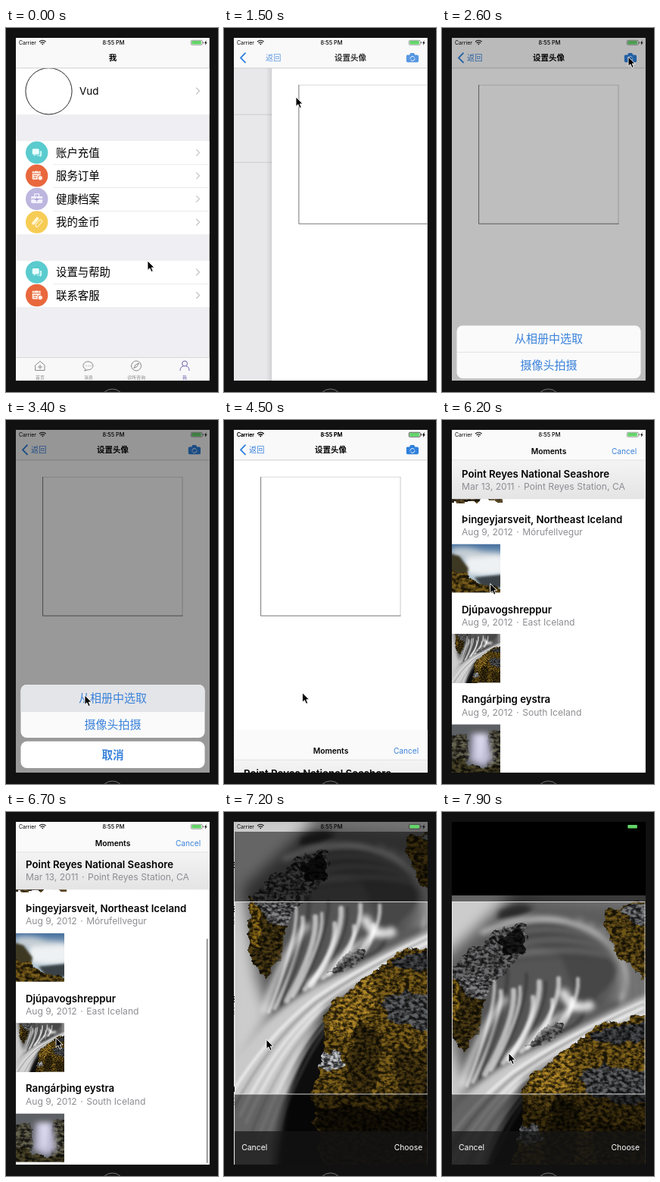
An HTML page for the animation above (8000 ms loop, 280 px wide and 480 px high).

```html
<!DOCTYPE html>
<html lang="zh">
<head>
<meta charset="utf-8">
<title>设置头像</title>
<style>
html, body { margin: 0; width: 100%; height: 100%; overflow: hidden; background: #111; }
svg { display: block; width: 100vw; height: 100vh; }
text { font-family: Inter, "Noto Sans CJK SC", "Noto Sans CJK", sans-serif; }
.mid { text-anchor: middle; }
.blue { fill: #3a82da; }
.line { fill: none; stroke-linecap: round; stroke-linejoin: round; }
</style>
</head>
<body>
<svg id="stage" viewBox="0 0 280 480"></svg>
<script>
const LOOP = 8000;
const box = (x, y, w, h, fill, more = '') =>
  `<rect x="${x}" y="${y}" width="${w}" height="${h}" fill="${fill}" ${more}/>`;
const label = (x, y, size, text, more = '') =>
  `<text x="${x}" y="${y}" font-size="${size}" ${more}>${text}</text>`;
const shape = (d, fill, more = '') => `<path d="${d}" fill="${fill}" ${more}/>`;
const stroke = (d, color, width, more = '') =>
  `<path class="line" d="${d}" stroke="${color}" stroke-width="${width}" ${more}/>`;
const group = (id, body, more = '') => `<g id="${id}" ${more}>${body}</g>`;
const filtered = (name, body) => `<g filter="url(#${name})">${body}</g>`;
const shade = id => box(13, 13, 256, 452, '#000', `id="${id}" opacity="0"`);
const blur = (id, size) => `<filter id="${id}" x="-30%" y="-30%" width="160%" height="160%"><feGaussianBlur stdDeviation="${size}"/></filter>`;

const defs = `<defs>
  <clipPath id="screen"><rect x="13" y="13" width="255.5" height="452"/></clipPath>
  <clipPath id="thumb"><rect width="64" height="64"/></clipPath>
  <clipPath id="photoEdge"><rect x="13" y="13" width="284" height="470"/></clipPath>
  <clipPath id="sheetTop"><rect x="19.5" y="349" width="243" height="70" rx="8"/></clipPath>
  ${blur('fine', 1.5) + blur('soft', 3.5) + blur('haze', 9)}
  <filter id="rough" color-interpolation-filters="sRGB">
    <feTurbulence type="fractalNoise" baseFrequency=".06" numOctaves="4" seed="7" result="n"/>
    <feTurbulence type="fractalNoise" baseFrequency=".16 .24" numOctaves="4" seed="3" result="m"/>
    <feColorMatrix in="m" values="3 0 0 0 -1  3 0 0 0 -1  3 0 0 0 -1  0 0 0 0 1" result="grain"/>
    <feDisplacementMap in="SourceGraphic" in2="n" scale="16" xChannelSelector="R" yChannelSelector="G" result="body"/>
    <feComposite in="body" in2="grain" operator="arithmetic" k1="1.3" k2=".35" result="lit"/>
    <feComposite in="lit" in2="body" operator="in"/>
  </filter>
  <linearGradient id="edge"><stop offset="0" stop-color="#000" stop-opacity="0"/><stop offset="1" stop-color="#000" stop-opacity=".1"/></linearGradient>
  <linearGradient id="band" x2="0" y2="1"><stop offset="0" stop-color="#f5f5f6"/><stop offset="1" stop-color="#e4e4e5"/></linearGradient>
  <linearGradient id="sky" x2="0" y2="1"><stop offset="0" stop-color="#456f9e"/><stop offset=".4" stop-color="#a9bdcc"/></linearGradient>
  ${group('falls', waterfall(), 'clip-path="url(#photoEdge)"')}
  ${group('status', statusBar())}
</defs>`;

function waterfall() {
  const streak = (d, color, width, alpha) => stroke(d, color, width, `opacity="${alpha}"`);
  let swirl = '', fan = '', stream = '';
  for (let i = 0; i < 8; i++) {
    swirl += streak(`M${78 + i * 6} ${62 + i * 5}Q${160 + i * 4} ${26 + i * 9} ${222 + i * 2} ${60 + i * 5}T${262 - i * 5} 150`,
      i % 2 ? '#222' : '#fff', 5, i ? .2 : .7);
    swirl += streak(`M${205 + i * 8} ${44 + i * 3}Q${270 + i * 4} 80 ${262 + i * 5} 160`, i % 2 ? '#444' : '#ddd', 5, .3);
  }
  for (let i = 0; i < 15; i++) {
    const x = 94 + i * 8.5, y = 126 + 16 * Math.sin(i * 2.3) + i;
    fan += streak(`M${x} ${y}Q${x + 3} ${y + 38} ${58 + i * 8} ${264 - i * 5}`, i % 3 == 2 ? '#383838' : '#fff', 4 + i % 4, .6);
  }
  for (let i = 0; i < 8; i++) {
    stream += streak(`M290 ${154 + i * 3}Q${185 + i} ${200 + i * 4} ${118 + i * 3} ${246 + i * 5}Q${50 + i * 7} ${300 + i * 4} ${4 + i * 8} ${380 + i * 10}`,
      i % 3 == 1 ? '#8c8c8c' : '#fff', 4, .6 - i * .05);
  }
  return box(13, 13, 284, 470, '#5c5c5c')
    + filtered('haze', shape('M0 0H130L60 66L24 100L42 220L60 270L0 380Z', '#ccc') + shape('M90 0H300V30L160 20Z', '#777'))
    + filtered('soft', shape('M88 66Q180 28 245 62Q270 110 245 150L200 170Q150 100 88 66Z', '#474747')
      + shape('M100 34Q128 18 146 30L126 44L98 46Z', '#2a2a2a')
      + shape('M128 74L180 90L205 150L190 185L150 215L80 240L60 220L92 118Z', '#555') + swirl)
    + filtered('rough', shape('M38 112L62 84L98 62L132 48L140 66L128 92L104 118L80 142L56 156Z', '#424243')
      + shape('M96 72L132 54L136 88L108 92Z', '#111')
      + shape('M46 122L78 114L98 128L76 152Z', '#505052')
      + shape('M34 108L46 128L60 146L82 150L76 178L58 220L44 212L30 180Z', '#2f250c')
      + shape('M36 110L46 128L48 180L34 178Z', '#58430f')
      + shape('M238 34L266 26L300 22V128L272 106L246 74Z', '#43340f')
      + shape('M262 30L296 26V52L270 50Z', '#4a4b4e'))
    + filtered('fine', fan)
    + filtered('rough', shape('M144 204L160 186L182 180L188 190L160 212L136 212Z', '#444'))
    + filtered('soft', streak('M52 262Q74 190 108 150', '#fff', 9, .6) + streak('M186 142Q196 166 220 158', '#fff', 13, .8)
      + streak('M200 160Q164 182 112 226', '#fff', 9, .6)
      + shape('M310 138Q220 178 170 206Q95 236 50 282L0 340V470H62Q72 350 134 252Q190 205 310 176Z', '#c9c9c9')
      + shape('M134 256Q100 312 82 372L66 490H150V300Z', '#111'))
    + filtered('fine', stream)
    + filtered('rough', shape('M130 270L148 244L176 228L206 202L230 184L300 172V490H138L118 408L116 366L132 318Z', '#4d3b10')
      + shape('M146 250L200 214L196 262L160 300L138 290Z', '#6b5218')
      + shape('M222 194L262 184L300 182V206L262 204L228 208Z', '#2c2d2f')
      + shape('M206 250L236 238L300 246V290L262 290L218 272Z', '#3a3b3d')
      + shape('M130 318L150 314L160 334L138 340L124 336Z', '#77797c')
      + shape('M176 274L206 296L204 360L178 384L156 350Z', '#2c220a')
      + shape('M222 312L300 316V420L230 400Z', '#30250b')
      + shape('M118 388L300 394V490H136Z', '#1d1608'));
}

function statusBar() {
  return label(17, 21.7, 7, 'Carrier')
    + stroke('M44.5 17.8Q48.3 14.7 52.1 17.8M46 19.6Q48.3 17.8 50.6 19.6', '#000', 1.1)
    + shape('M47 20.8H49.6L48.3 22.5Z', '#000')
    + label(142, 21.8, 7.3, '8:55 PM', 'class="mid" font-weight="500"')
    + box(244.3, 16.3, 15, 6, 'none', 'rx="1.4" stroke="#000" stroke-opacity=".6" stroke-width=".6"')
    + box(245.3, 17, 12.5, 4.6, '#62d568', 'rx=".8"')
    + box(260, 18.2, .9, 2.2, '#000', 'opacity=".6"')
    + shape('M264.8 16.3L262 19.8H263.6L262.8 22.7L265.6 19H264Z', '#000');
}

const glyphs = {
  chat: box(-6, -5, 9, 7.5, '#e8ffff', 'rx="1.5"') + shape('M-4 2L-4 5L0 2ZM4 -2H6.5V4L5 6L3.5 4.5H-1L1 3.5H4Z', '#c9f5f5'),
  date: box(-6, -6, 11, 11, '#fff0e8', 'rx="1.2"') + box(-6, -3.4, 11, 1, '#e9673d')
    + stroke('M-3.5 -7V-5M2.5 -7V-5M-4 0H0M-4 2.5H-1', '#e9673d', 1)
    + '<circle cx="4.5" cy="3" r="3.3" fill="#fff0e8" stroke="#e9673d"/>',
  kit: box(-7.5, -3.5, 15, 9, '#f4f1ff', 'rx="1.3"') + stroke('M-3 -4V-6.5H3V-4', '#f4f1ff', 1.2)
    + stroke('M-7 0H7M0 -1.5V3.5M-2 1H2', '#a79fd2', 1),
  coin: `<g transform="rotate(-50)">${box(-6, -4.5, 12, 4, '#fff6d4', 'rx="2"') + box(-5, 1, 11, 4, 'none', 'rx="2" stroke="#fff6d4" stroke-width="1.1"')}</g>`
};
const arrow = y => stroke(`M251.5 ${y - 4}L255.5 ${y}L251.5 ${y + 4}`, '#c3c3c8', 1.2);
const row = (y, text, color, glyph) =>
  `<g transform="translate(40.7 ${y})"><circle r="14.7" fill="${color}"/>${glyphs[glyph]}</g>`
  + label(66, y + 5.2, 14.4, text) + arrow(y);
const rule = (x, y, color = '#dcdce0') => box(x, y, 268.5 - x, .6, color);
const tab = (x, text, icon, color) =>
  `<g transform="translate(${x} 445.5)">${stroke(icon, color, 1)}</g>` + label(x, 463, 6, text, `class="mid" fill="${color}"`);

const home = box(13, 53, 256, 412, '#efeff3') + box(13, 53, 256, 61, '#fff') + box(13, 149, 256, 123, '#fff')
  + box(13, 307, 256, 61, '#fff')
  + '<circle cx="56.5" cy="83.3" r="30.6" fill="#fff" stroke="#111" stroke-width=".9"/>'
  + label(97, 88, 13.4, 'Vud') + arrow(83)
  + [179.7, 210.3, 241, 337.3].map(y => rule(62, y)).join('')
  + row(164.3, '账户充值', '#5acbce', 'chat') + row(194.8, '服务订单', '#e9673d', 'date')
  + row(225.4, '健康档案', '#bdb6df', 'kit') + row(256, '我的金币', '#f6cc55', 'coin')
  + row(322, '设置与帮助', '#5acbce', 'chat') + row(352.5, '联系客服', '#e9673d', 'date')
  + box(13, 434, 256, 31, '#f8f8f9') + rule(13, 434, '#c4c4c8')
  + tab(45, '首页', 'M-6 -1L0 -6L6 -1V6H-6ZM0 -1V4M-2.5 1.5H2.5', '#888')
  + tab(109, '消息', 'M-4 4.5A6.5 5.5 0 1 1 -1 5.3L-5 6.5ZM-3 0H-2.8M0 0H.2M3 0H3.2', '#888')
  + tab(172, '诊所咨询', 'M-6.5 0A6.5 6.5 0 1 1 6.5 0A6.5 6.5 0 1 1 -6.5 0M3.2 -3.2L1 1L-3.2 3.2L-1 -1Z', '#888')
  + tab(236, '我', 'M-3.5 -3A3.5 3.5 0 1 1 3.5 -3A3.5 3.5 0 1 1 -3.5 -3M-6 6Q-6 1 -2 .5M2 .5Q6 1 6 6', '#6c62ae')
  + shade('homeShade');

const profile = box(13, 53, 256, 412, '#fcfcfe') + rule(13, 113.8, '#c6c6ca') + rule(13, 176.8, '#c6c6ca') + shade('profileShade');

const avatar = box(5, 53, 8, 412, 'url(#edge)') + box(13, 53, 256, 412, '#fff')
  + stroke('M48.5 75.3H233', '#ccc', .7) + stroke('M233 75.5V258', '#aaa', .6)
  + stroke('M48.6 75.5V258.2H233', '#555', .8);

const camera = shape('M242 35.5H245L246.3 33H251L252.3 35.5H255.2Q257 35.5 257 37.3V43.5Q257 45.3 255.2 45.3H242.6Q240.8 45.3 240.8 43.5V37Q240.8 35.5 242 35.5Z', '#2f80dc')
  + stroke('M245.8 40.2A3.1 3.1 0 0 1 251.2 38.5M252 40.6A3.1 3.1 0 0 1 246.6 42.3', '#fff', .9);
const nav = box(13, 13, 256, 40, '#f9f9fa') + rule(13, 52.6, '#b2b2b6')
  + group('homeTitle', label(141, 43, 10.5, '我', 'class="mid" font-weight="600"'))
  + group('chevron', stroke('M28 33.2L22 39.3L28 45.4', '#2f80dc', 1.9))
  + group('back', label(33, 43, 10.2, '返回', 'class="blue"'))
  + group('avatarTitle', label(141, 43.2, 10.5, '设置头像', 'class="mid" font-weight="600"'))
  + group('camera', camera);

const sheet = `<g clip-path="url(#sheetTop)">${box(19, 349, 244, 70, '#fafafa') + box(19, 349, 244, 35, '#e4e5e8', 'id="pressed"') + box(19, 384, 244, .6, '#d4d4d8')}</g>`
  + box(19.5, 423.8, 243, 35.2, '#fff', 'rx="8"')
  + label(141, 372, 15, '从相册中选取', 'class="mid blue"') + label(141, 407, 15, '摄像头拍摄', 'class="mid blue"')
  + label(141, 446.8, 14.6, '取消', 'class="mid blue" font-weight="600"');

const moment = (y, title, date, place) => label(26, y, 13.25, title, 'font-weight="600"')
  + label(26, y + 16.6, 12.1, `${date} &#8202;·&#8202; ${place}`, 'fill="#8e8e93"');
const thumb = (y, body) => `<g transform="translate(13 ${y})" clip-path="url(#thumb)">${body}</g>`;
const plunge = box(0, 0, 64, 64, 'url(#sky)')
  + filtered('soft', shape('M0 6Q20 2 40 10L64 12V20H0Z', '#c3ccd2') + shape('M18 18L70 14V40Q40 44 16 38Z', '#eef1f3'))
  + filtered('fine', shape('M-4 12L10 16L22 32L20 42H-4Z', '#3c3722') + shape('M30 44L70 40V56L44 62Z', '#3b4247'))
  + filtered('rough', shape('M-8 32L8 34L24 42L34 52L50 56L72 58V74H-8Z', '#4a3910'));
const gorge = box(0, 0, 64, 64, '#5d6064')
  + filtered('rough', shape('M-8 14L18 12L24 20L18 50L-8 70ZM48 8L72 4V72L46 58Z', '#3e3c30'))
  + filtered('soft', shape('M26 12H48L54 48L40 56L24 48Z', '#bbb8d2') + shape('M32 12H44L40 46H34Z', '#dcdaee'))
  + filtered('rough', shape('M-8 42L12 46L26 54L40 60L72 50V72H-8Z', '#2e2a18'));
const falls = '<use href="#falls" transform="scale(.25) translate(-13 -112)"/>';

const picker = box(13, 13, 256, 452, '#fff')
  + group('list', filtered('rough', box(9, 90, 68, 18, '#40331a'))
    + moment(135.5, 'Þingeyjarsveit, Northeast Iceland', 'Aug 9, 2012', 'Mórufellvegur') + thumb(163.5, plunge)
    + moment(254.5, 'Djúpavogshreppur', 'Aug 9, 2012', 'East Iceland') + thumb(282.3, falls)
    + moment(373, 'Rangárþing eystra', 'Aug 9, 2012', 'South Iceland') + thumb(401.3, gorge))
  + group('pinned', box(13, 50, 256, 54.3, 'url(#band)') + moment(75.8, 'Point Reyes National Seashore', 'Mar 13, 2011', 'Point Reyes Station, CA'))
  + box(13, 13, 256, 40, '#fafafa') + rule(13, 52.6, '#d2d2d5')
  + label(141, 44.8, 10.3, 'Moments', 'class="mid" font-weight="600"') + label(224, 44.6, 10.1, 'Cancel', 'class="blue"')
  + box(264.8, 167, 1.8, 296, '#8c8c8c', 'id="scrollbar" rx=".9"')
  + shade('pickerShade');

const editor = box(13, 13, 256, 452, '#000') + '<use id="photo" href="#falls"/>'
  + box(13, 26, 256, 92, '#000', 'opacity=".5"') + box(13, 372, 256, 93, '#000', 'opacity=".5"')
  + box(13.5, 118.5, 254.5, 253.5, 'none', 'stroke="#e8e8e8" stroke-width=".9"')
  + box(13, 421, 256, 44, '#161616', 'opacity=".72"')
  + label(22, 446, 10.4, 'Cancel', 'fill="#fff"') + label(261, 446, 10.3, 'Choose', 'fill="#fff" text-anchor="end"');

const pointer = shape('M0 0V12.4L2.9 9.8L5 14.6L7.2 13.6L5.2 9H9Z', '#000', 'stroke="#fff" stroke-width=".9"');

document.getElementById('stage').innerHTML = defs + box(0, 0, 280, 480, '#111')
  + '<circle cx="140.5" cy="491.5" r="15.5" fill="#161616" stroke="#777" stroke-width="1"/>'
  + '<g clip-path="url(#screen)">' + box(13, 13, 256, 452, '#fff')
  + group('home', home) + group('profile', profile) + group('avatar', avatar) + nav + '<use href="#status"/>'
  + shade('dim') + group('sheet', sheet) + group('picker', picker) + group('editor', editor)
  + '<use id="topStatus" href="#status"/></g>' + group('cursor', pointer);

const $ = id => document.getElementById(id);
const ramp = (t, start, length) => Math.min(1, Math.max(0, (t - start) / length));
const easeOut = u => 1 - (1 - u) ** 3;
const smooth = u => u * u * (3 - 2 * u);
const move = (id, x, y = 0) => $(id).setAttribute('transform', `translate(${x} ${y})`);
const fade = (id, value) => $(id).setAttribute('opacity', value);
const show = (id, on) => { $(id).style.display = on ? '' : 'none'; };

// time, x, y
const cursorPath = [[0, 187, 307], [450, 92, 88], [1100, 92, 88], [1400, 95, 91], [1850, 95, 91], [2350, 246, 38],
  [2700, 246, 38], [3200, 104, 363], [4450, 104, 363], [5300, 59, 47], [5800, 59, 47], [6450, 66, 298],
  [6900, 66, 298], [7200, 56, 300], [7500, 113, 222], [7900, 88, 318], [8000, 88, 318]];

function cursorAt(t) {
  const i = Math.max(1, cursorPath.findIndex(p => p[0] > t));
  const [a, b] = [cursorPath[i - 1], cursorPath[i]];
  const u = smooth((t - a[0]) / (b[0] - a[0]));
  return [a[1] + (b[1] - a[1]) * u, a[2] + (b[2] - a[2]) * u];
}

function draw(t) {
  const toProfile = easeOut(ramp(t, 500, 480));
  const toAvatar = easeOut(ramp(t, 1300, 480));
  const sheetUp = easeOut(ramp(t, 2500, 350)) - smooth(ramp(t, 3500, 300));
  const pickerUp = easeOut(ramp(t, 4480, 480));
  const toEditor = easeOut(ramp(t, 6800, 480));

  show('profile', toProfile > 0);
  show('avatar', toAvatar > 0);
  move('home', -77 * toProfile);
  move('profile', 256 * (1 - toProfile) - 77 * toAvatar);
  move('avatar', 256 * (1 - toAvatar));
  fade('homeShade', .1 * toProfile);
  fade('profileShade', .1 * toAvatar);

  move('homeTitle', -128 * toProfile);
  fade('homeTitle', 1 - toProfile);
  fade('chevron', toProfile);
  const backIn = toAvatar || toProfile;
  move('back', 112 * (1 - backIn));
  fade('back', backIn);
  move('avatarTitle', 133 * (1 - toAvatar));
  fade('avatarTitle', toAvatar);
  fade('camera', toAvatar);

  fade('dim', .4 * sheetUp);
  move('sheet', 0, 120 * (1 - sheetUp));
  show('pressed', t >= 3300);

  show('picker', pickerUp > 0);
  show('topStatus', pickerUp > 0);
  move('picker', -77 * toEditor, 452 * (1 - pickerUp));
  fade('pickerShade', .1 * toEditor);
  const scroll = smooth(ramp(t, 6250, 350));
  move('list', 0, -3.8 * scroll);
  move('pinned', 0, -2 * scroll);
  fade('scrollbar', ramp(t, 6250, 100));

  show('editor', toEditor > 0);
  move('editor', 256 * (1 - toEditor));
  const drag = smooth(ramp(t, 7500, 400));
  move('photo', -25 * drag, 97 * drag);

  move('cursor', ...cursorAt(t));
}

const start = performance.now();
function frame() {
  draw((performance.now() - start) % LOOP);
  requestAnimationFrame(frame);
}
draw(0);
requestAnimationFrame(frame);
</script>
</body>
</html>
```
